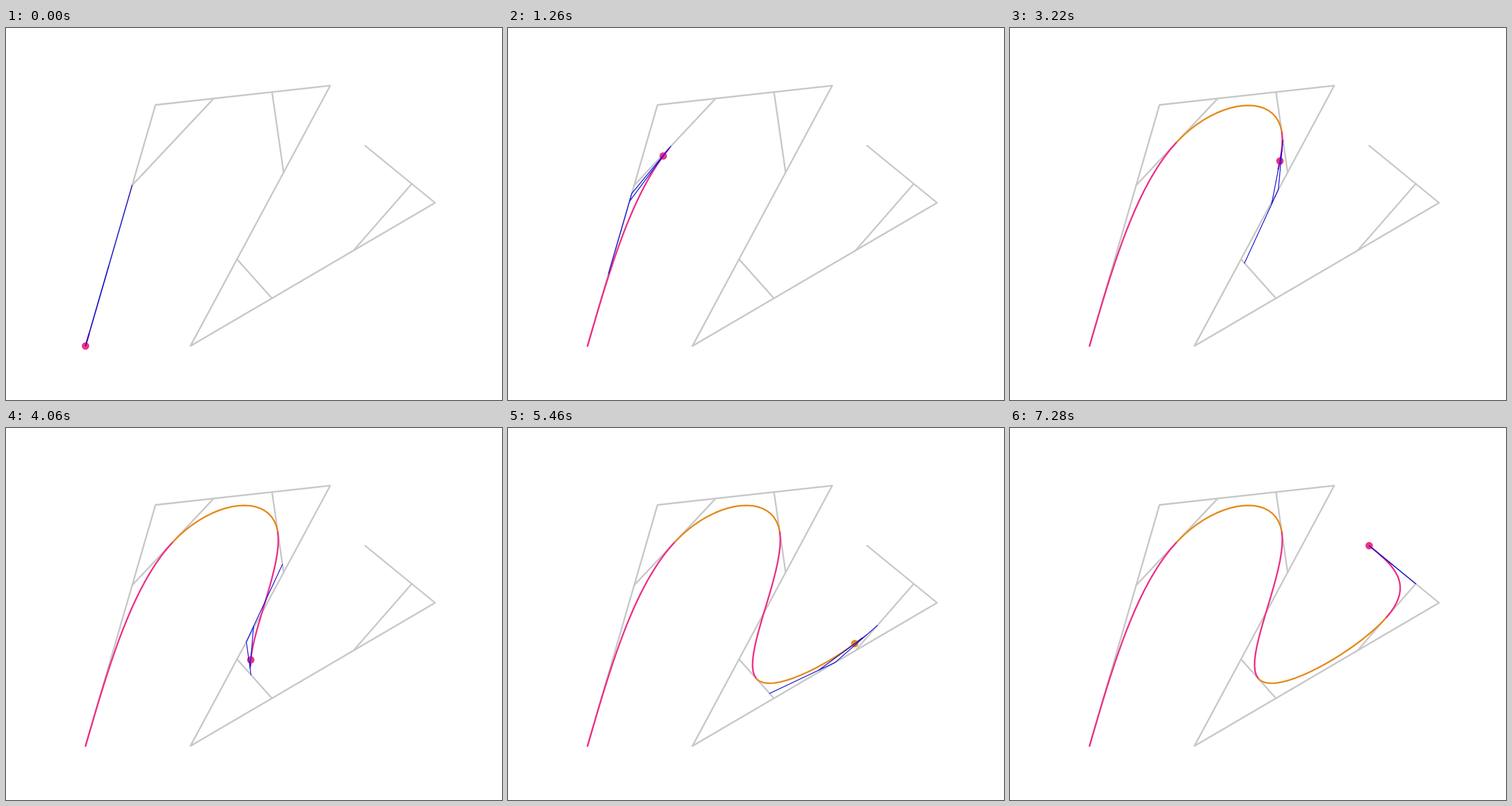
Recreate the animation shown at these times as an HTML page with a canvas. Size 864x648 px, loop 7350 ms.

```html
<!DOCTYPE html>
<html>
<head>
<meta charset="utf-8">
<title>B-spline construction</title>
<style>
html, body { margin: 0; width: 100%; height: 100%; overflow: hidden; background: #fff; }
canvas { display: block; }
</style>
</head>
<body>
<canvas width="864" height="648"></canvas>
<script>
const ctx = document.querySelector('canvas').getContext('2d');
const STEP = 70, SUB = 20;
const GRAY = '#c8c8c8', BLUE = '#140fd8', COLORS = ['#ee3288', '#e58b1e'];

const control = [[138.5, 554], [260.4, 134], [564.8, 100.3], [321.2, 554], [747.4, 304.5], [625.6, 205]];
const mix = (a, b, t) => a.map((v, i) => v + (b[i] - v) * t);
const level = (pts, t) => pts.slice(1).map((p, i) => mix(pts[i], p, t));
const point = (pts, t) => pts.length > 1 ? point(level(pts, t), t) : pts[0];

// Each polygon leg gives two inner Bezier points; pieces meet halfway across the corners.
const legs = control.slice(1).map((p, i) => [mix(control[i], p, 1 / 3), mix(control[i], p, 2 / 3)]);
const joints = legs.slice(1).map((leg, i) => mix(legs[i][1], leg[0], 0.5));
const ends = [control[0], ...joints, control[control.length - 1]];
const pieces = legs.map((leg, i) => [ends[i], ...leg, ends[i + 1]]);
const frames = pieces.length * (SUB + 1);

function line(pts, color, width) {
  ctx.beginPath();
  pts.forEach(p => ctx.lineTo(...p));
  ctx.strokeStyle = color;
  ctx.lineWidth = width;
  ctx.stroke();
}

function curve(i, steps) {
  const pts = Array.from({ length: steps + 1 }, (_, k) => point(pieces[i], k / SUB));
  line(pts, COLORS[i % 2], 2.8);
}

function draw(frame) {
  const now = Math.floor(frame / (SUB + 1));
  const step = frame % (SUB + 1);
  const t = step / SUB;
  ctx.clearRect(0, 0, 864, 648);
  ctx.lineCap = ctx.lineJoin = 'round';

  line(control, GRAY, 2.8);
  legs.slice(1).forEach((leg, i) => line([legs[i][1], leg[0]], GRAY, 2.8));

  for (let i = 0; i < now; i++) curve(i, SUB);
  curve(now, Math.min(step + 1, SUB));

  ctx.beginPath();
  ctx.arc(...point(pieces[now], t), 6.5, 0, Math.PI * 2);
  ctx.fillStyle = COLORS[now % 2];
  ctx.fill();

  const first = level(pieces[now], t);
  line(first, BLUE, 1.4);
  line(level(first, t), BLUE, 1.4);
}

const start = performance.now();
function tick() {
  draw(Math.floor((performance.now() - start) / STEP) % frames);
  requestAnimationFrame(tick);
}
tick();
</script>
</body>
</html>
```
